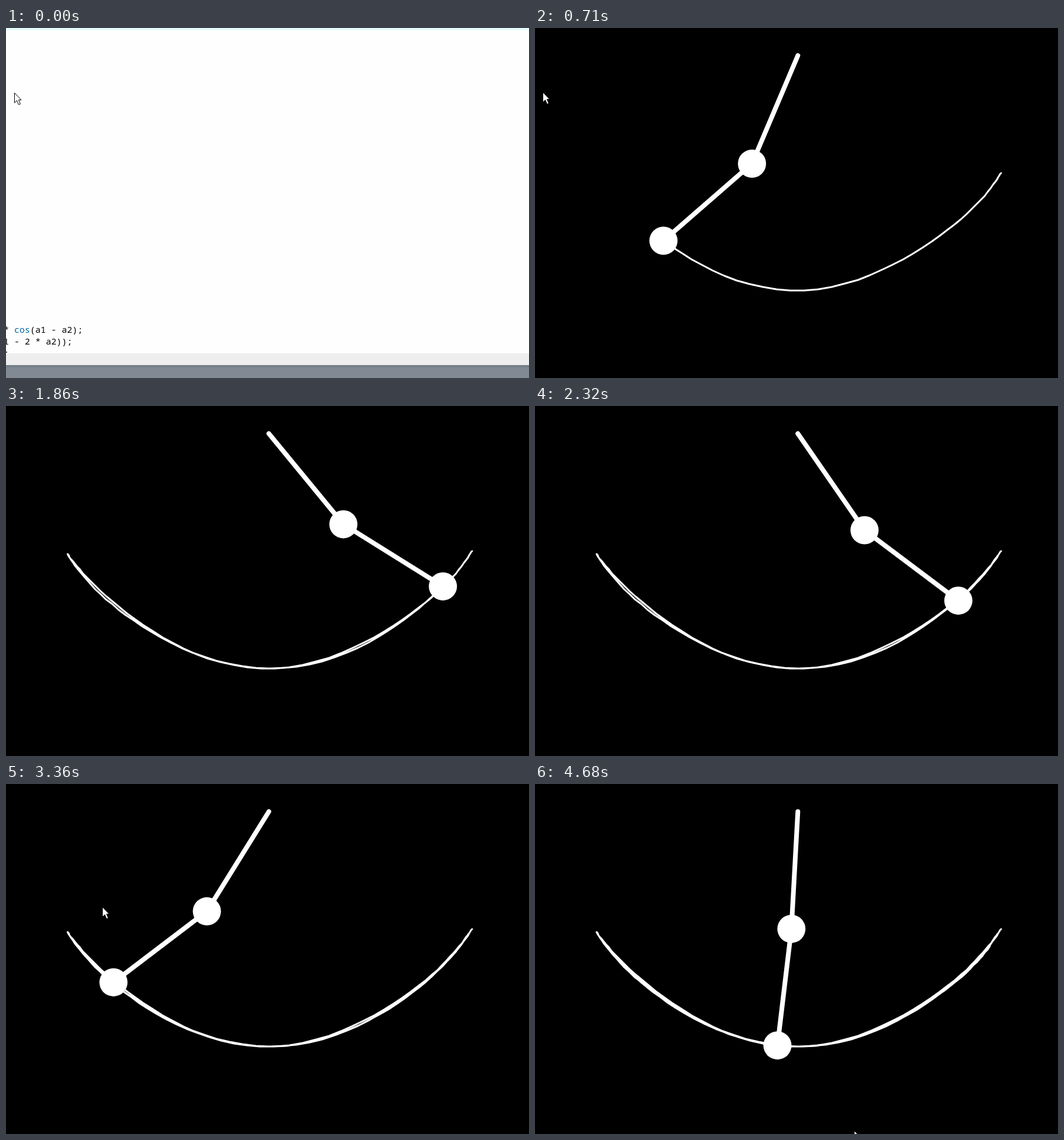
Recreate the animation shown at these times as an HTML page with a canvas. Size 892 by 596 pixels, loop 4.72 s.

```html
<!DOCTYPE html>
<html lang="en">
<head>
<meta charset="utf-8">
<title>Double pendulum</title>
<style>
  html, body { margin: 0; width: 100%; height: 100%; overflow: hidden; background: #000; }
  canvas { display: block; }
</style>
</head>
<body>
<canvas id="stage" width="892" height="596"></canvas>
<script>
const ctx = document.getElementById('stage').getContext('2d');
const WIDTH = 892, HEIGHT = 596, LOOP = 4720;
const ARM = 200, GRAVITY = 1, DAMPING = 0.999, BOB = 24;
const PIVOT = { x: 448.3, y: 47 };
const OPENS_AT = 50, FADE_TIME = 82;

// Equal masses, both arms released at 60 degrees; one pose per simulation tick.
function simulate(ticks) {
  const { sin, cos } = Math, k = GRAVITY / ARM, poses = [];
  let a = Math.PI / 3, b = a, va = 0, vb = 0;
  for (let n = 0; n < ticks; n++) {
    const x1 = PIVOT.x + ARM * sin(a), y1 = PIVOT.y + ARM * cos(a);
    poses.push({ x1, y1, x2: x1 + ARM * sin(b), y2: y1 + ARM * cos(b) });
    const d = a - b, den = 3 - cos(2 * d);
    const accA = (-3 * k * sin(a) - k * sin(a - 2 * b)
      - 2 * sin(d) * (vb * vb + va * va * cos(d))) / den;
    const accB = 2 * sin(d) * (2 * va * va + 2 * k * cos(a) + vb * vb * cos(d)) / den;
    va += accA; vb += accB;
    a += va; b += vb;
    va *= DAMPING; vb *= DAMPING;
  }
  return poses;
}
const poses = simulate(330);

// Fractional tick at which the lower bob passes x, moving left, for the given time.
function leftwardPass(x, count) {
  for (let n = 1; n < poses.length; n++) {
    const before = poses[n - 1].x2, after = poses[n].x2;
    if (before > x && after <= x && --count === 0) {
      return n - (x - after) / (before - after);
    }
  }
}
const TICKS_PER_MS = leftwardPass(413.5, 3) / 4680;

const mix = (a, b, u) => a + (b - a) * u;

function poseAt(tick) {
  const n = Math.floor(tick), p = poses[n], q = poses[n + 1], pose = {};
  for (const key in p) pose[key] = mix(p[key], q[key], tick - n);
  return pose;
}

function rect(color, x, y, w, h) {
  ctx.fillStyle = color;
  ctx.fillRect(x, y, w, h);
}

function text(str, x, y, color = '#000') {
  ctx.fillStyle = color;
  ctx.fillText(str, x, y);
}

function drawEditor() {
  rect('#fefefe', 0, 0, WIDTH, HEIGHT);
  rect('#e8fcfc', 0, 0, WIDTH, 4);
  ctx.font = '15px "Noto Sans Mono", "DejaVu Sans Mono", monospace';
  text('*', -4, 519);
  text('cos', 14, 519, '#006699');
  text('(a1 - a2);', 41, 519);
  text('1 - 2 * a2));', -4, 539);
  text(';', -4, 559);
  rect('#eeeeee', 0, 554, WIDTH, 20);
  const shade = ctx.createLinearGradient(0, 574, 0, 579);
  shade.addColorStop(0, '#6e7780');
  shade.addColorStop(1, '#818a94');
  rect(shade, 0, 574, WIDTH, 22);
}

function line(points, width) {
  ctx.lineWidth = width;
  ctx.beginPath();
  points.forEach(([x, y]) => ctx.lineTo(x, y));
  ctx.stroke();
}

function disc(x, y) {
  ctx.beginPath();
  ctx.arc(x, y, BOB, 0, 2 * Math.PI);
  ctx.fill();
}

function drawSketch(time) {
  const tick = time * TICKS_PER_MS, pose = poseAt(tick);
  const alpha = 1 - Math.exp(-time / FADE_TIME);
  const scale = mix(0.94, 1, alpha);
  const pivot = [PIVOT.x, PIVOT.y];
  const upper = [pose.x1, pose.y1], lower = [pose.x2, pose.y2];
  const trail = poses.slice(0, Math.floor(tick) + 1)
    .map(p => [Math.round(p.x2), Math.round(p.y2)]);

  ctx.save();
  ctx.translate(448, 297);
  ctx.scale(scale, scale);
  ctx.translate(-448, -297);
  ctx.globalAlpha = alpha;
  rect('#000', -4, -3, 904, 600);

  ctx.globalCompositeOperation = 'lighter';
  ctx.strokeStyle = ctx.fillStyle = '#fff';
  ctx.lineCap = ctx.lineJoin = 'round';
  line([...trail, lower], 3);
  line([pivot, upper], 8);
  line([upper, lower], 8);
  disc(...upper);
  disc(...lower);
  ctx.restore();
}

function drawCursor(x, y) {
  ctx.save();
  ctx.translate(Math.round(x) + 0.5, Math.round(y) + 0.5);
  ctx.beginPath();
  [[0, 0], [0, 17], [4, 13], [7, 20], [10, 19], [7, 12], [11.5, 12]]
    .forEach(([px, py]) => ctx.lineTo(px, py));
  ctx.closePath();
  ctx.fillStyle = '#fff';
  ctx.fill();
  ctx.strokeStyle = '#000';
  ctx.lineWidth = 1;
  ctx.stroke();
  ctx.restore();
}

// Shows the cursor between two moments, moving in a straight line.
function slideCursor(time, begin, end, from, to = from) {
  if (time < begin || time >= end) return;
  const u = (time - begin) / (end - begin);
  drawCursor(mix(from[0], to[0], u), mix(from[1], to[1], u));
}

function render(time) {
  drawEditor();
  if (time >= OPENS_AT) drawSketch(time);
  slideCursor(time, 0, OPENS_AT, [14, 110]);
  slideCursor(time, OPENS_AT, 1100, [13, 109]);
  slideCursor(time, 1100, 1250, [13, 109], [-16, 124]);
  slideCursor(time, 3270, 4200, [115, 166], [626, 608]);
  slideCursor(time, 4640, LOOP, [544, 590]);
}

const start = performance.now();
function animate() {
  const time = (performance.now() - start) % LOOP;
  render(Math.floor(time / 10) * 10);
  requestAnimationFrame(animate);
}
animate();
</script>
</body>
</html>
```
